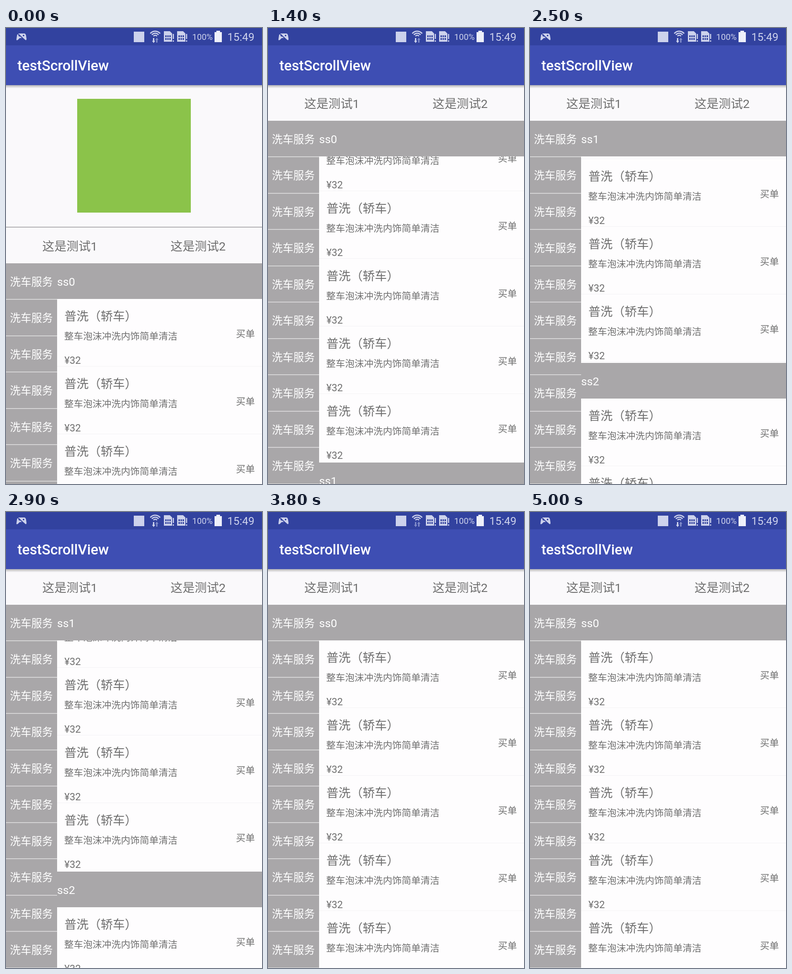
An HTML page with a canvas that plays this animation: 561 by 998 pixels, repeating every 5.1 s.

```html
<!DOCTYPE html>
<html lang="zh-CN">
<head>
<meta charset="utf-8">
<style>
html, body { margin: 0; width: 100%; height: 100%; overflow: hidden; background: #fafafc; }
canvas { display: block; }
</style>
</head>
<body>
<canvas id="stage" width="561" height="998"></canvas>
<script>
const ctx = document.getElementById('stage').getContext('2d');
const W = 561, H = 998, LOOP = 5100, STEP = 100;
const GREY = '#a9a7a9', INK = '#6f6f6f', PALE = '#cdd2ec';
const FONT = 'Roboto, "Noto Sans CJK SC", "Noto Sans CJK", sans-serif';

// Layout: resting positions with the page at the top
const BAR = 125, TABS = 436, STICKY = 515, ROW = 78, SIDE = 112;
const ITEM = 148, ITEMS = 5, SECTION = ROW + ITEM * ITEMS + 2;

// [time, offset] of the page and of the list inside it
const pageKeys = [[600, 0], [900, 120], [1200, 300], [1300, 312], [3800, 312], [4000, 220],
  [4300, 10], [4400, 0], [4700, 0], [4800, 90], [4900, 250], [5000, 312]];
const listKeys = [[1200, 0], [1400, 72], [1800, 760], [2100, 1021], [2500, 1110],
  [2900, 1056], [3200, 700], [3600, 30], [3700, 0]];
const glowKeys = [[4300, 0], [4400, 0.8], [4500, 1], [4700, 0]];

// Monotone cubic interpolation through the keys
function track(keys, t) {
  const last = keys.length - 1;
  if (t <= keys[0][0]) return keys[0][1];
  if (t >= keys[last][0]) return keys[last][1];
  const slope = i => i < 0 || i >= last ? 0 : (keys[i + 1][1] - keys[i][1]) / (keys[i + 1][0] - keys[i][0]);
  const tangent = i => {
    const a = slope(i - 1), b = slope(i);
    return a * b > 0 ? 2 * a * b / (a + b) : 0;
  };
  const i = keys.findIndex(k => k[0] > t) - 1;
  const [t0, a] = keys[i], [t1, b] = keys[i + 1];
  const d = t1 - t0, u = (t - t0) / d, v = 1 - u;
  return a * v * v * (1 + 2 * u) + b * u * u * (3 - 2 * u) + d * u * v * (tangent(i) * v - tangent(i + 1) * u);
}

function rect(x, y, w, h, color) {
  ctx.fillStyle = color;
  ctx.fillRect(x, y, w, h);
}

function text(str, x, y, size, color = INK, align = 'left', weight = 400) {
  ctx.font = `${weight} ${size}px ${FONT}`;
  ctx.textAlign = align;
  ctx.fillStyle = color;
  ctx.fillText(str, x, y);
}

function shape(path, color) {
  ctx.fillStyle = color;
  ctx.fill(new Path2D(path));
}

function drawItem(y) {
  text('普洗（轿车）', 128, y + 47, 26.5);
  text('整车泡沫冲洗内饰简单清洁', 127.5, y + 89, 20.7);
  text('买单', 545.5, y + 84, 20.7, INK, 'right');
  text('¥32', 128, y + 142, 21.8);
  rect(SIDE, y + ITEM - 1, W, 1, '#f4f3f5');
}

function drawList(top, scroll) {
  rect(SIDE, top, W, H, '#fefdfe');
  for (let s = 0; s < 4; s++) {
    const y = top + s * SECTION - scroll;
    if (y > H || y + SECTION < top) continue;
    for (let i = 0; i < ITEMS; i++) drawItem(y + ROW + i * ITEM);
    rect(SIDE, y, W, ROW, GREY);
    text('ss' + s, SIDE, y + 49, 24.7, '#fff');
  }
}

function drawSide(top) {
  rect(0, top, SIDE, H, GREY);
  for (let i = 0; i < 10; i++) {
    const y = top + ROW + i * 79.5;
    rect(0, Math.round(y), SIDE, 1.5, '#e2e1e2');
    text('洗车服务', 8.5, y + 50, 23.5, '#fff');
  }
}

function drawTop(page, section) {
  rect(0, 0, W, STICKY - page, '#faf9fb');
  rect(156, 155 - page, 249, 249, '#8bc34a');
  rect(0, TABS - 1 - page, W, 1.5, '#9d9c9d');
  text('这是测试1', 140, TABS + 51 - page, 26.5, INK, 'center');
  text('这是测试2', 421, TABS + 51 - page, 26.5, INK, 'center');
  const y = STICKY - page;
  rect(0, y, W, ROW, GREY);
  text('洗车服务', 8.5, y + 48.5, 23.5, '#fff');
  text('ss' + section, SIDE, y + 49, 24.7, '#fff');
}

function drawGlow(amount) {
  if (amount <= 0) return;
  ctx.globalAlpha = amount;
  shape(`M0 125V130Q280 ${130 + 54 * amount} 561 130V125Z`, 'rgba(63,81,181,.14)');
  ctx.globalAlpha = 1;
}

function drawSim(x) {
  shape(`M${x} 7h13l5 5v18h-18z`, PALE);
  for (let i = 0; i < 6; i++) rect(x + 3 + i % 3 * 4.5, 16 + (i > 2) * 6, 3, 4, '#34449f');
  rect(x + 19.5, 13, 2.5, 11, PALE);
  rect(x + 19.5, 27, 2.5, 3, PALE);
}

function drawWifi(active) {
  ctx.strokeStyle = PALE;
  ctx.lineWidth = 2.6;
  for (const r of [5, 9.5, 14]) {
    ctx.beginPath();
    ctx.arc(327, 21, r, -Math.PI * 0.78, -Math.PI * 0.22);
    ctx.stroke();
  }
  const dim = '#7f8bc9';
  shape('M322 22h3v6h2l-3.5 5-3.5-5h2z', active ? PALE : dim);
  shape('M329 32h3v-6h2l-3.5-5-3.5 5h2z', dim);
}

function drawBars(active) {
  const shadow = ctx.createLinearGradient(0, BAR, 0, BAR + 7);
  shadow.addColorStop(0, 'rgba(0,0,0,.28)');
  shadow.addColorStop(1, 'rgba(0,0,0,0)');
  rect(0, BAR, W, 7, shadow);
  rect(0, 0, W, BAR, '#3e4eb3');
  rect(0, 0, W, 38, '#32429f');
  text('testScrollView', 25, 93, 31.1, '#fff', 'left', 500);

  shape('M27 12h13q3 0 4 5l1 7q0 4-4 2l-4-4h-7l-4 4q-4 2-3-2l1-7q1-5 3-5z', PALE);
  rect(27, 16, 5, 1.5, '#32429f');
  rect(28.8, 14.2, 1.5, 5, '#32429f');
  rect(37, 15, 3, 3, '#32429f');
  ctx.strokeStyle = '#32429f';
  ctx.lineWidth = 2;
  ctx.stroke(new Path2D('M24 11L43 28'));

  rect(280, 8, 23, 23, PALE);
  drawWifi(active);
  drawSim(346);
  drawSim(375);
  text('100%', 408, 26, 18.6, PALE);
  shape('M461 6h8v3h4v22h-16V9h4z', '#eef0fa');
  text('15:49', 485, 28, 23.8, PALE);
}

function draw(t) {
  const page = Math.round(track(pageKeys, t));
  const scroll = Math.round(track(listKeys, t));
  const top = STICKY - page;
  drawList(top, scroll);
  drawSide(top);
  drawTop(page, Math.floor(scroll / SECTION));
  drawGlow(track(glowKeys, t));
  drawBars(t < 3700 || t >= 4900);
}

function tick() {
  const t = performance.now() % LOOP;
  draw(Math.floor(t / STEP) * STEP);
  requestAnimationFrame(tick);
}
tick();
</script>
</body>
</html>
```
